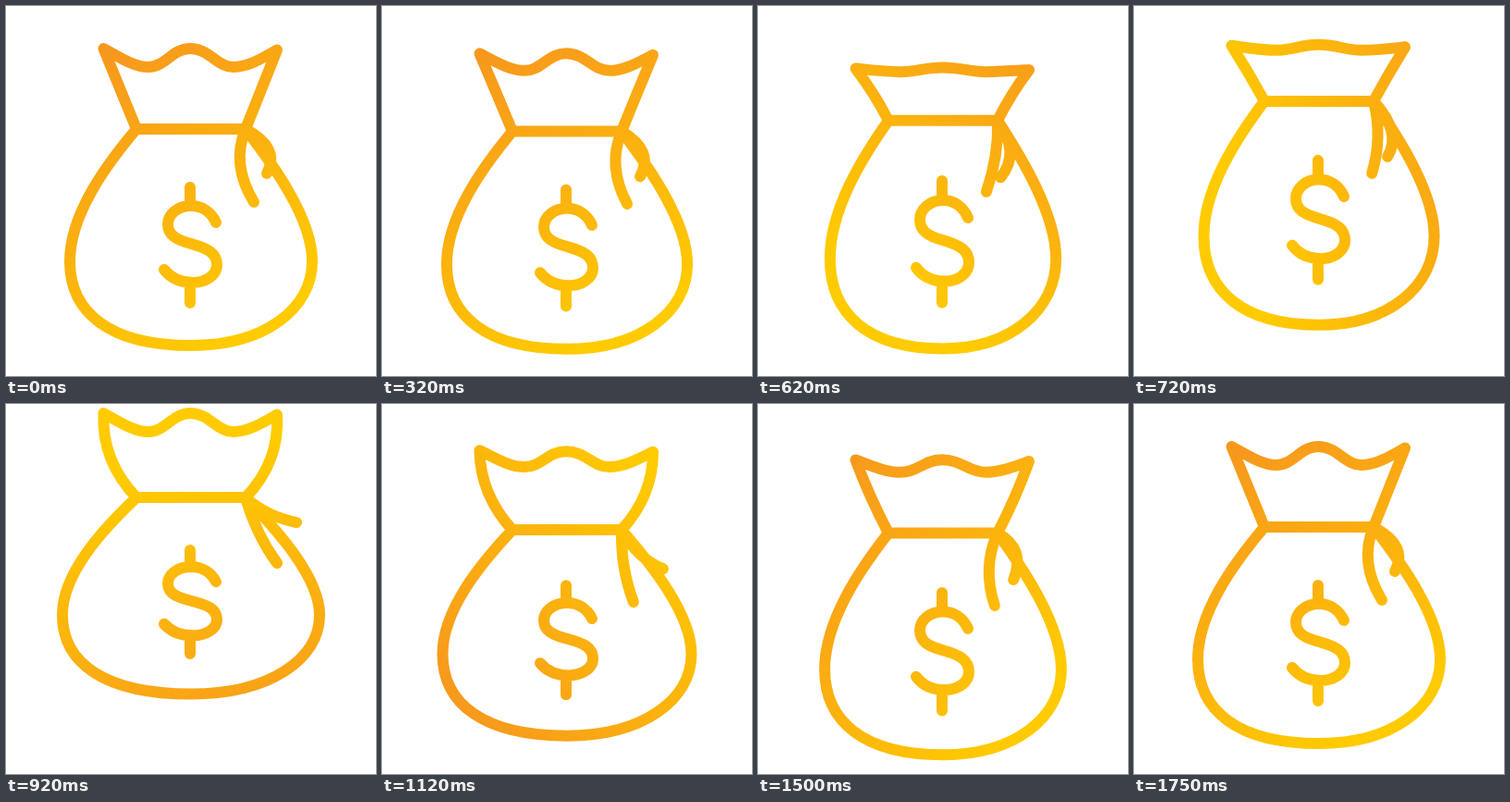
Write an HTML page with a canvas that moves like this. It is 400 px wide and 400 px high and loops after 1770 ms.

```html
<!DOCTYPE html>
<html lang="en">
<head>
<meta charset="utf-8">
<title>Bouncing money bag</title>
<style>
  html, body { margin: 0; width: 100%; height: 100%; overflow: hidden; background: #fff; }
  canvas { display: block; width: 100vw; height: 100vh; }
</style>
</head>
<body>
<canvas id="stage" width="400" height="400"></canvas>
<script>
const ctx = document.getElementById('stage').getContext('2d');
const LOOP = 1770;
const CENTER = 200;
const NECK = 59;

// Strings are [control x, control y, end x, end y]; shift slides the gradient toward its orange end.
const rest = {
  neck: 133, tip: 46, dip: 66, crest: 46, bow: 0, half: 131, waist: 276, bottom: 367,
  signTop: 196, signEnd: 321, inner: [243, 171, 268, 212], outer: [297, 153, 282, 181],
  angle: 58, shift: 12
};
const poses = [
  { at: 270, ...rest },
  { at: 500, neck: 148, tip: 88, dip: 94, crest: 87, bow: 2, half: 122.5, waist: 298, bottom: 394,
    signTop: 213, signEnd: 345, inner: [249, 185, 243, 223], outer: [278, 180, 257, 205],
    angle: 90, shift: 12 },
  { at: 720, neck: 103, tip: 43, dip: 48, crest: 42, bow: 1, half: 124.5, waist: 249, bottom: 345,
    signTop: 167, signEnd: 296, inner: [269, 142, 257, 181], outer: [290, 137, 274, 163],
    angle: 165, shift: 70 },
  { at: 920, neck: 101, tip: 10, dip: 30, crest: 10, bow: -20, half: 139, waist: 228, bottom: 313.5,
    signTop: 158, signEnd: 270, inner: [270, 140, 293, 172], outer: [281, 121, 314, 128],
    angle: 255, shift: 25 },
  { at: 1120, neck: 136, tip: 50, dip: 68, crest: 51, bow: -17, half: 134.5, waist: 270, bottom: 358.5,
    signTop: 196, signEnd: 314, inner: [258, 177, 272, 214], outer: [276, 167, 304, 178],
    angle: 320, shift: 10 },
  { at: 1320, neck: 144, tip: 70, dip: 79, crest: 70, bow: -7, half: 126.5, waist: 293, bottom: 385.5,
    signTop: 209, signEnd: 337, inner: [244, 181, 249, 222], outer: [282, 162, 276, 195],
    angle: 372, shift: 10 },
  { at: 1750, ...rest, angle: rest.angle + 360 }
];

// Smooth curve through all poses, at rest at both ends.
function sample(time, read) {
  const last = poses.length - 1;
  const t = Math.min(Math.max(time, poses[0].at), poses[last].at);
  let i = 0;
  while (i < last - 1 && t > poses[i + 1].at) i++;
  const slope = k => k === 0 || k === last ? 0
    : (read(poses[k + 1]) - read(poses[k - 1])) / (poses[k + 1].at - poses[k - 1].at);
  const span = poses[i + 1].at - poses[i].at;
  const u = (t - poses[i].at) / span;
  const ease = u * u * (3 - 2 * u);
  return read(poses[i]) * (1 - ease) + read(poses[i + 1]) * ease
    + span * u * (1 - u) * ((1 - u) * slope(i) - u * slope(i + 1));
}

function poseAt(time) {
  const pose = {};
  for (const key of Object.keys(rest)) {
    pose[key] = Array.isArray(rest[key])
      ? rest[key].map((_, n) => sample(time, p => p[key][n]))
      : sample(time, p => p[key]);
  }
  return pose;
}

function setGradient({ angle, shift }) {
  const a = angle * Math.PI / 180;
  const along = d => [CENTER + Math.cos(a) * d, 205 + Math.sin(a) * d];
  const g = ctx.createLinearGradient(...along(-165 - shift), ...along(165 - shift));
  g.addColorStop(0, '#f7981d');
  g.addColorStop(1, '#ffcb00');
  ctx.strokeStyle = g;
}

// One half of the outline; side is -1 for left and 1 for right.
function traceHalf(p, side) {
  const left = side < 0;
  const x = d => CENTER + side * d;
  const tipX = left ? 94.5 : 93;
  const tipY = p.tip + (left ? 0 : 1.5);
  const drop = p.waist - p.neck;

  ctx.moveTo(199, p.crest);
  ctx.bezierCurveTo(x(20), p.crest, x(28), p.dip, x(46), p.dip);
  ctx.bezierCurveTo(x(62), p.dip, x(78), tipY + (p.dip - tipY) * 0.45, x(tipX), tipY);
  ctx.quadraticCurveTo(x((tipX + NECK) / 2 - p.bow), (tipY + p.neck) / 2 - p.bow * 0.3,
    x(NECK), p.neck);
  ctx.bezierCurveTo(x(NECK + (p.half - NECK) * (left ? 0.47 : 0.43)), p.neck + drop * 0.28,
    x(p.half), p.neck + drop * (left ? 0.65 : 0.68), x(p.half), p.waist);
  ctx.bezierCurveTo(x(p.half), p.waist + (p.bottom - p.waist) * (left ? 0.61 : 0.56),
    x(p.half * (left ? 0.67 : 0.61)), p.bottom, CENTER, p.bottom);
}

function traceString(p, [cx, cy, ex, ey]) {
  ctx.moveTo(CENTER + NECK, p.neck);
  ctx.quadraticCurveTo(cx, cy, ex, ey);
}

function traceDollar(p) {
  ctx.save();
  ctx.translate(199, p.signTop);
  ctx.scale(1, (p.signEnd - p.signTop) / 125);
  ctx.moveTo(0, 0);
  ctx.lineTo(0, 20);
  ctx.moveTo(28, 38);
  ctx.bezierCurveTo(23, 27, 13, 20, 1, 20);
  ctx.bezierCurveTo(-13, 20, -24, 29, -24, 40);
  ctx.bezierCurveTo(-24, 52, -14, 57, 1, 61);
  ctx.bezierCurveTo(19, 66, 29, 71, 29, 84);
  ctx.bezierCurveTo(29, 95, 17, 103, 3, 103);
  ctx.bezierCurveTo(-10, 103, -21, 98, -28, 89);
  ctx.moveTo(0, 103);
  ctx.lineTo(0, 125);
  ctx.restore();
}

function draw(time) {
  const p = poseAt(time);
  ctx.fillStyle = '#fff';
  ctx.fillRect(0, 0, 400, 400);
  ctx.lineWidth = 12;
  ctx.lineCap = ctx.lineJoin = 'round';
  setGradient(p);
  ctx.beginPath();
  traceHalf(p, -1);
  traceHalf(p, 1);
  ctx.moveTo(CENTER - NECK, p.neck);
  ctx.lineTo(CENTER + NECK, p.neck);
  traceString(p, p.inner);
  traceString(p, p.outer);
  traceDollar(p);
  ctx.stroke();
}

const start = performance.now();
function tick() {
  draw((performance.now() - start) % LOOP);
  requestAnimationFrame(tick);
}
tick();
</script>
</body>
</html>
```
